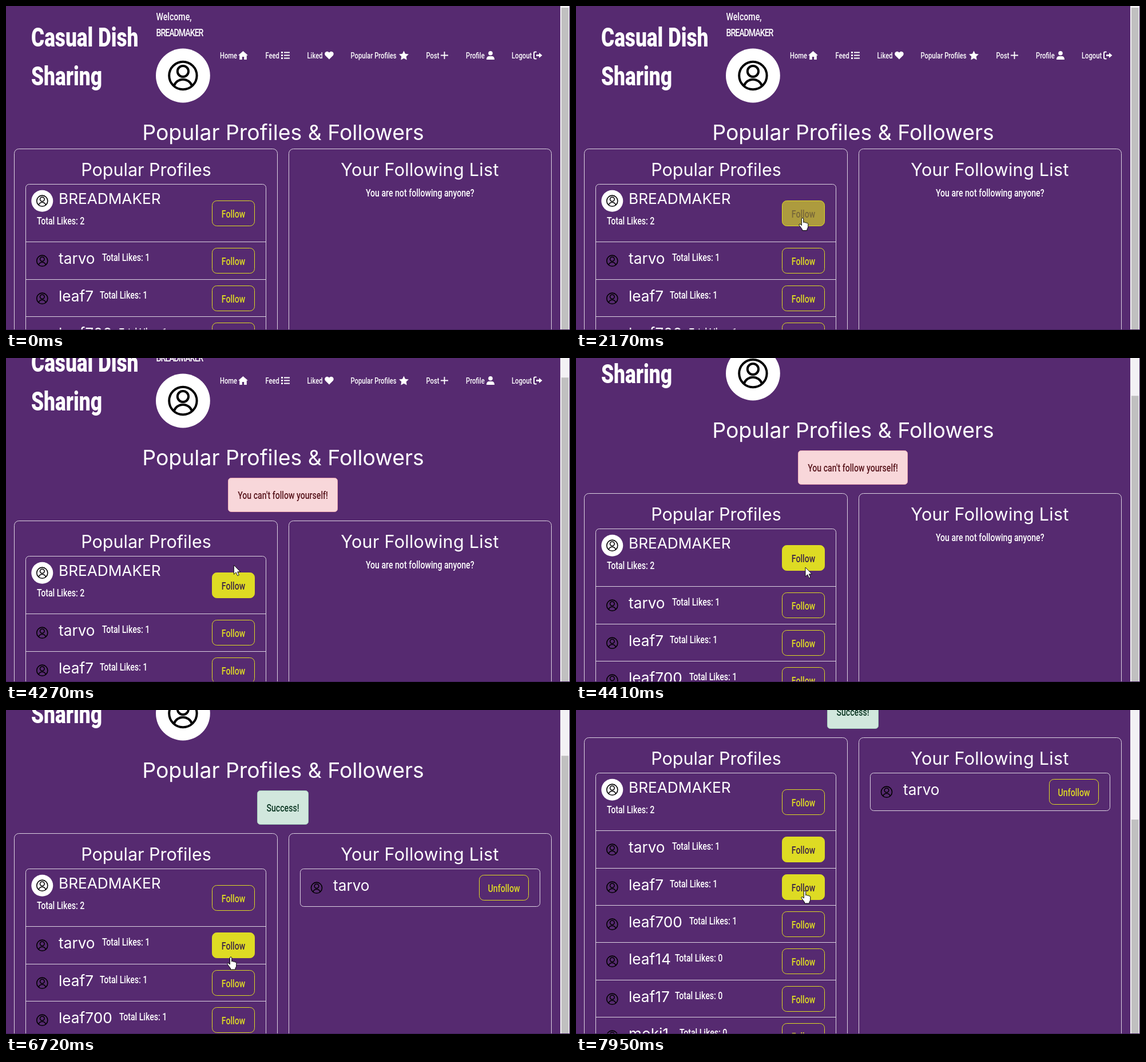
An HTML page that plays this animation: 986 by 568 pixels, repeating every 8 s.

```html
<!DOCTYPE html>
<html lang="en">
<head>
<meta charset="utf-8">
<title>Popular profiles</title>
<style>
  html, body { margin: 0; width: 100%; height: 100%; overflow: hidden; background: #562a70; }
  svg { display: block; width: 100%; height: 100%; }
  text { white-space: pre; }
  .body { font: 500 18.4px Roboto, "Liberation Sans", sans-serif; }
  .nav { font: 500 14.6px Roboto, "Liberation Sans", sans-serif; }
  .brand { font: 800 45.5px Roboto, "Liberation Sans", sans-serif; }
  .head { font-family: Inter, "Open Sans", sans-serif; font-weight: 400; }
  .frame { fill: none; stroke: #ddd4e2; stroke-width: 1; }
  .ico { fill: none; stroke: #000; stroke-width: 4; stroke-linecap: round; }
</style>
</head>
<body>
<svg id="stage" viewBox="0 0 986 568" preserveAspectRatio="none"></svg>
<script>
const LOOP = 8000, YELLOW = [222, 219, 35], DARK = [62, 38, 70];
const ALERT_SHIFT = 82, NOTCH = 94.6, BOX = 250.5;
const JUMP = 2840, SUCCESS = 5720;

const clamp = v => Math.max(0, Math.min(1, v));
const mix = (a, b, p) => a + (b - a) * p;
const crisp = v => Math.floor(v) + .5;
const rgb = p => `rgb(${YELLOW.map((c, i) => Math.round(mix(c, DARK[i], p)))})`;

// Condensed face: one fixed width ratio per style
const narrow = (s, x, y, { cls = 'body', fill = '#fff', anchor = 'start', ratio = .768, ls = 0 } = {}) =>
  `<text class="${cls}" transform="translate(${x} ${y}) scale(${ratio} 1)" fill="${fill}"
    text-anchor="${anchor}" letter-spacing="${ls}">${s}</text>`;

const heading = (s, x, y, size, anchor = 'middle', ls = 0) =>
  `<text class="head" x="${x}" y="${y}" font-size="${size}" fill="#fff"
    text-anchor="${anchor}" letter-spacing="${ls}">${s}</text>`;

const frame = (x, y, w, h, r) =>
  `<rect class="frame" x="${x}" y="${y}" width="${w}" height="${h}" rx="${r}"/>`;

const person = (x, y, k) =>
  `<g class="ico" transform="translate(${x} ${y}) scale(${k})">
    <circle r="24.2"/><circle cy="-7.5" r="9.6"/>
    <path d="M-15.5 17.5A16.5 16.5 0 0 1 15.500 17.500"/></g>`;

const button = (label, x, y, w, id = '') =>
  `<g id="${id}"><rect x="${x}" y="${y}" width="${w}" height="44" rx="8"
    fill="rgb(${YELLOW})" fill-opacity="0" stroke="rgb(${YELLOW})"/>
    ${narrow(label, x + w / 2, y + 29.5, { fill: rgb(0), anchor: 'middle' })}</g>`;

const alertBox = (id, label, w, bg, edge, ink) =>
  `<g id="${id}"><rect x="${484 - w / 2}" y="257.5" width="${w}" height="59" rx="5" fill="${bg}" stroke="${edge}"/>
    ${narrow(label, 484, 294, { fill: ink, anchor: 'middle' })}</g>`;

const NAV = [
  ['Home', 374, 406, 79, 'M8.5 0L0 7.6h2.2V15h4.6v-5h3.4v5h4.6V7.6H17z'],
  ['Feed', 453.5, 481, 80, 'M0 0h3v3H0zM0 5h3v3H0zM0 10h3v3H0zM5 .6h10v1.9H5zM5 5.6h10v1.9H5zM5 10.6h10v1.9H5z'],
  ['Liked', 526.5, 557, 79.5, 'M8 14L1.2 7.2C-2 3 3.5-2.5 8 2 12.5-2.5 18 3 14.8 7.2z'],
  ['Popular Profiles', 602.5, 687, 78.5, 'M8.5 0l2.5 5.2 6 .8-4.3 4.1 1 5.9-5.2-2.8-5.2 2.8 1-5.9L0 6l6-.8z'],
  ['Post', 734.5, 760, 80, 'M5.6 0h1.8v5.6H13v1.8H7.4V13H5.6V7.4H0V5.6h5.6z'],
  ['Profile', 804, 840, 79, 'M7 0a3.8 3.8 0 1 1 0 7.6a3.8 3.8 0 1 1 0-7.6zM0 15c0-4 2-6 4.5-6h5c2.5 0 4.5 2 4.5 6z'],
  ['Logout', 884, 922, 79.5, 'M5.5 0H3a3 3 0 0 0-3 3v8a3 3 0 0 0 3 3h2.5v-2H3a1 1 0 0 1-1-1V3a1 1 0 0 1 1-1h2.5zM10 2.5L15.5 7 10 11.5v-3H5v-3h5z']
];

// name, likes, x of the likes text
const PEOPLE = [
  ['BREADMAKER', 2, 54], ['tarvo', 1, 168], ['leaf7', 1, 164], ['leaf700', 1, 198],
  ['leaf14', 0, 173], ['leaf17', 0, 173], ['moki1', 0, 181]
];
const LIST = BOX + 62;
const rowTop = i => i ? crisp(LIST + 101.4 + (i - 1) * 65.35) : LIST;
const buttonTop = i => rowTop(i) + (i ? 11 : 29);

function row([name, likes, lx], i) {
  const y = rowTop(i), first = i === 0;
  return (first ? `<circle cx="63.3" cy="${y + 29.2}" r="19" fill="#fff"/>`
                : `<path class="frame" d="M34.5 ${y}H454.5"/>`) +
    person(63.3, y + (first ? 29.2 : 33.2), .395) +
    heading(name, 92, y + (first ? 34.5 : 38.5), 26.2, 'start') +
    narrow(`Total Likes: ${likes}`, lx, y + (first ? 70 : 33)) +
    button('Follow', 360.5, buttonTop(i), 74, 'b' + i);
}

const header =
  narrow('Casual Dish', 44, 70.5, { cls: 'brand', ratio: .775 }) +
  narrow('Sharing', 44, 139, { cls: 'brand', ratio: .775 }) +
  narrow('Welcome,', 262.5, 24.5) +
  narrow('BREADMAKER', 262.5, 53, { ls: -1.3 }) +
  '<circle cx="309.4" cy="122" r="47.4" fill="#fff"/>' + person(309.4, 122, 1) +
  NAV.map(([s, x, ix, iy, d]) => narrow(s, x, 92, { cls: 'nav' }) +
    `<path fill="#fff" transform="translate(${ix} ${iy})" d="${d}"/>`).join('') +
  heading('Popular Profiles &amp; Followers', 484.5, 234.5, 37.4);

const panels =
  frame(14.5, BOX, 460, 900, 8) + frame(494.5, BOX, 459, 900, 8) +
  heading('Popular Profiles', 245, BOX + 47, 30.5) +
  heading('Your Following List', 723.5, BOX + 47, 30.5, 'middle', .3) +
  frame(34.5, LIST, 420, 800, 6) + PEOPLE.map(row).join('') +
  `<g id="empty">${narrow('You are not following anyone?', 723.7, BOX + 83.5, { anchor: 'middle' })}</g>
   <g id="following">${frame(514.5, LIST, 419, 66, 6)}
     ${person(543, LIST + 33.2, .395)}
     ${heading(PEOPLE[1][0], 572, LIST + 38.5, 26.2, 'start')}
     ${button('Unfollow', 827.5, LIST + 11, 86)}</g>`;

document.getElementById('stage').innerHTML =
  `<rect width="986" height="568" fill="#562a70"/>
   <g id="page">${header}
     ${alertBox('danger', "You can't follow yourself!", 191, '#f8d7da', '#f1aeb5', '#58151c')}
     ${alertBox('success', 'Success!', 89, '#d1e7dd', '#a3cfbb', '#0a3622')}
     <g id="panels">${panels}</g></g>
   <rect x="969" width="16" height="568" fill="#f3f1f4"/>
   <rect id="thumb" x="971" width="12.5" height="800" fill="#c0c0c0"/>
   <path d="M985.5 0V567.5H0" fill="none" stroke="#41205a"/>
   <g id="cursor" fill="#fff" stroke="#000" stroke-linejoin="round">
     <path id="arrow" stroke-width=".9" d="M0 0V16.2l3.8-3.5 2.6 6 2.6-1.1-2.6-5.8h5z"/>
     <path id="hand" stroke-width="1" d="M-1.7 13V1.7a1.7 1.7 0 0 1 3.4 0V8c.5-1.1 2.8-.9 3 .6 .7-1 2.7-.7 2.8.8 .8-.8 2.3-.3 2.3 1.2V15c0 2-1.3 3.5-1.8 4.5V22H-.5V20C-2 18-4.5 14.5-6 12.5-6.5 10.5-4.2 10-3 11.5z"/>
   </g>`;

const el = id => document.getElementById(id);
const show = (id, on) => el(id).setAttribute('display', on ? 'inline' : 'none');
const move = (id, x, y) => el(id).setAttribute('transform', `translate(${x} ${y})`);

// One wheel notch takes four 70 ms steps
function notch(t, start) {
  const p = clamp((Math.floor((t - start) / 70) + 1) / 4);
  return NOTCH * (.7 * p + .3 * p * p * (3 - 2 * p));
}
const scrollAt = t => Math.round(notch(t, 4200) + notch(t, 6720) + notch(t, 7000));

const PATH = [
  [720, 834, 515], [860, 650, 508], [1000, 425, 516], [1070, 398, 506], [1140, 388, 478],
  [1210, 385, 456], [1350, 389, 447], [1680, 389, 447], [2240, 397, 361], [4200, 397, 361],
  [4410, 401, 367], [4610, 401, 367], [5310, 393, 433], [7130, 393, 433], [7480, 400, 317]
];
function pointer(t) {
  const j = PATH.findIndex(k => k[0] > t);
  if (j < 0) return PATH[PATH.length - 1].slice(1);
  if (j === 0) return PATH[0].slice(1);
  const [t0, x0, y0] = PATH[j - 1], [t1, x1, y1] = PATH[j], p = (t - t0) / (t1 - t0);
  return [mix(x0, x1, p), mix(y0, y1, p)];
}

// row, highlight start, highlight end
const GLOW = [
  [0, 2075, 5440], [1, 1195, 1830], [1, 5085, LOOP * 2], [2, 990, 1110],
  [4, 7130, 7180], [3, 7240, 7370], [2, 7430, LOOP * 2]
];
const FADE = 150;
const glow = (t, i) => Math.max(...GLOW.filter(g => g[0] === i).map(([, a, b]) =>
  clamp(Math.min((t - a) / FADE, clamp((b - a) / FADE) - (t - b) / FADE))), 0);

function draw(t) {
  const scroll = scrollAt(t), shift = t >= JUMP ? ALERT_SHIFT : 0, done = t >= SUCCESS;
  move('page', 0, -scroll);
  move('panels', 0, shift);
  el('thumb').setAttribute('y', 3 + scroll * .666);
  show('danger', shift && !done);
  show('success', done);
  show('empty', !done);
  show('following', done);

  PEOPLE.forEach((_, i) => {
    const p = glow(t, i), [box, label] = el('b' + i).children;
    box.setAttribute('fill-opacity', p);
    label.setAttribute('fill', rgb(p));
  });

  const [x, y] = pointer(t);
  const over = x > 360 && x < 435 && PEOPLE.some((_, i) => {
    const top = buttonTop(i) + shift - scroll;
    return y > top && y < top + 45;
  });
  const still = t >= JUMP && t < 4610, rolling = t >= 6720 && t < 7130;
  const hand = rolling || (over && !still);
  show('cursor', t >= 720);
  show('hand', hand);
  show('arrow', !hand);
  move('cursor', x, y);
}

function tick() {
  draw(performance.now() % LOOP);
  requestAnimationFrame(tick);
}
tick();
</script>
</body>
</html>
```
